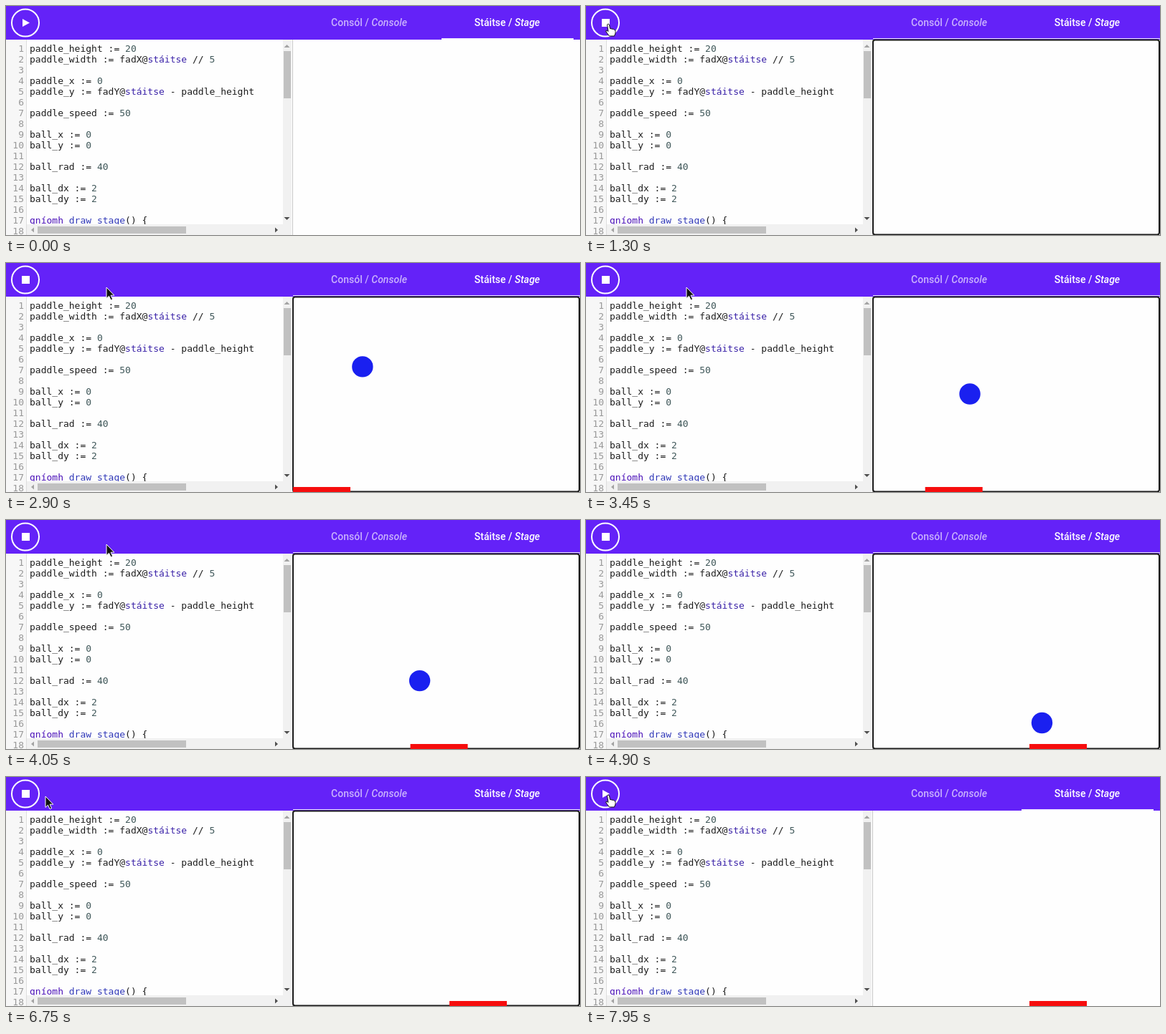
Animation of 800 by 320 pixels, one loop 8000 ms. Source, as an HTML page:

```html
<!DOCTYPE html>
<html lang="ga">
<head>
<meta charset="utf-8">
<style>
html, body { margin: 0; width: 100%; height: 100%; overflow: hidden; background: #fefefe; }
svg { display: block; }
.code text { font: 13px "DejaVu Sans Mono", monospace; fill: #1c1c1c; }
.code .num { fill: #999; text-anchor: end; }
.tab { font: 500 14px Roboto, sans-serif; text-anchor: middle; fill: #fff; }
.tab tspan { font-style: italic; }
.n { fill: #40585a; }
.a { fill: #3a22a8; }
.k { fill: #4a10b8; }
.d { fill: #3038b8; }
</style>
</head>
<body>
<svg width="800" height="320" viewBox="0 0 800 320">
  <defs>
    <clipPath id="editor"><rect x="29" y="47" width="357" height="258"/></clipPath>
    <clipPath id="canvas"><rect x="400" y="48" width="400" height="272"/></clipPath>
  </defs>

  <rect width="800" height="320" fill="#fefefe"/>
  <rect y="47" width="28.5" height="273" fill="#f7f7f7"/>
  <path d="M28.5 47V320" stroke="#ddd"/>
  <g class="code" id="numbers"></g>
  <g class="code" id="lines" clip-path="url(#editor)"></g>

  <path d="M386 47h12v273h-12zM29 305h357v15H29z" fill="#f1f1f1"/>
  <path d="M387 63h10v66h-10zM44 308h207v10H44z" fill="#c1c1c1"/>
  <path d="M387.500 58l4-4 4 4zM39 309.500l-4 3.500 4 3.500z" fill="#a3a3a3"/>
  <path d="M387.500 295l4 4 4-4zM375 309.500l4 3.500-4 3.500z" fill="#505050"/>
  <path d="M399.500 47V320" stroke="#c8c8c8"/>

  <rect width="800" height="47" fill="#6422f8"/>
  <text class="tab" x="506" y="28" fill-opacity=".65">Consól / <tspan>Console</tspan></text>
  <text class="tab" x="698.500" y="28">Stáitse / <tspan>Stage</tspan></text>
  <rect id="underline" x="607" y="45" width="184" height="2" fill="#f4f0ff"/>

  <circle cx="27" cy="23.500" r="19" fill="none" stroke="#fff" stroke-width="2"/>
  <path id="play" d="M23 18l10 5.500-10 5.500z" fill="#fff"/>
  <rect id="stop" x="22" y="18" width="11" height="11" fill="#fff"/>

  <g id="ring" fill="none">
    <path d="M400 45.500H800" stroke="#eee8ff"/>
    <rect x="400" y="47.500" width="399" height="272" rx="3" stroke="#1a1a1a" stroke-width="2"/>
  </g>
  <g clip-path="url(#canvas)">
    <rect id="paddle" y="313" width="80" height="7" fill="#f60d0d"/>
    <circle id="ball" r="14.700" fill="#1a20f0"/>
  </g>

  <path id="arrow" d="M0 0v15.500l3.500-3.300 2.600 5.600 2.500-1.100-2.500-5.500h4.700z" fill="#111" stroke="#fff"/>
  <path id="hand" d="M-1.500 1q1.500-2 3 0l1 5.500 5 1q2.500.5 2.500 3v2.500l-1.500 4h-7l-4.500-6q-1-2 1.500-1.500l1.500 1z" fill="#fff" stroke="#111"/>
</svg>
<script>
const LOOP = 8000, PRESS = 1300, START = 1503, STOP = 7350;
const BALL_SPEED = 0.0693, PADDLE_STEP = 18.17;
const $ = id => document.getElementById(id);

// Markup: {class:text}
const source = `paddle_height := {n:20}
paddle_width := fadX@{a:stáitse} // {n:5}

paddle_x := {n:0}
paddle_y := fadY@{a:stáitse} - paddle_height

paddle_speed := {n:50}

ball_x := {n:0}
ball_y := {n:0}

ball_rad := {n:40}

ball_dx := {n:2}
ball_dy := {n:2}

{k:gníomh} {d:draw_stage}() {
`.split("\n");

source.forEach((line, i) => {
  const y = 63.5 + i * 15;
  const html = line.replace(/\{(\w):([^}]+)\}/g, '<tspan class="$1">$2</tspan>');
  $("numbers").innerHTML += `<text class="num" x="25" y="${y}">${i + 1}</text>`;
  $("lines").innerHTML += `<text x="33" y="${y}">${html}</text>`;
});

// Pointer stops: time, x, y
const path = [
  [50, 90, -22], [600, 31, 25], [1750, 31, 25], [2100, 68, 25], [2700, 140, 34],
  [6400, 140, 34], [6850, 31, 25], [LOOP, 31, 25]
];

function pointer(t) {
  const i = Math.max(1, path.findIndex(p => p[0] > t));
  const [t0, x0, y0] = path[i - 1], [t1, x1, y1] = path[i];
  const k = Math.max(0, (t - t0) / (t1 - t0));
  return [x0 + (x1 - x0) * k, y0 + (y1 - y0) * k];
}

function show(id, on) {
  $(id).style.display = on ? "" : "none";
}

function draw(now) {
  const t = now % LOOP;
  const running = t >= PRESS && t < STOP;
  show("play", !running);
  show("stop", running);
  show("ring", running);
  show("underline", !running);

  const steps = Math.min(12, Math.max(0, Math.floor((t - 3050) / 115) + 1));
  show("paddle", t >= START - 20);
  $("paddle").setAttribute("x", 400 + steps * PADDLE_STEP);

  const d = Math.max(0, t - START) * BALL_SPEED;
  show("ball", t >= START - 20);
  $("ball").setAttribute("cx", 400 + d);
  $("ball").setAttribute("cy", 48 + d);

  const [x, y] = pointer(t);
  const visible = t >= 50 && (t < 4500 || t >= 6400);
  const hover = Math.hypot(x - 27, y - 23.5) < 20;
  show("arrow", visible && !hover);
  show("hand", visible && hover);
  for (const id of ["arrow", "hand"]) $(id).setAttribute("transform", `translate(${x} ${y})`);
}

const begin = performance.now();
function tick() {
  draw(performance.now() - begin);
  requestAnimationFrame(tick);
}
tick();
</script>
</body>
</html>
```
